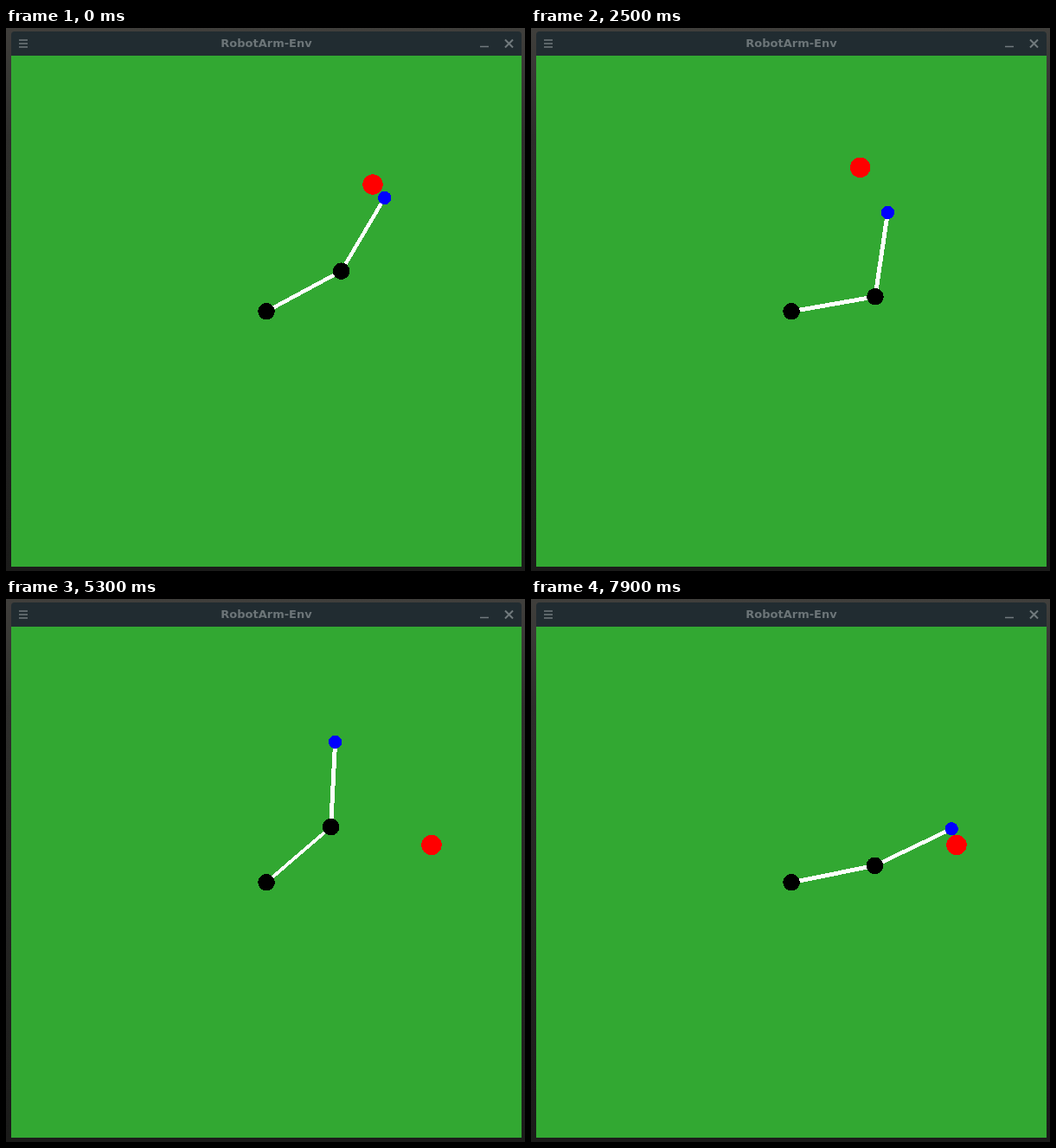
These frames come from a looping animation (600 by 628 pixels, 8000 ms). An HTML page:

```html
<!DOCTYPE html>
<html lang="en">
<head>
<meta charset="utf-8">
<title>RobotArm-Env</title>
<style>
  html, body { margin: 0; width: 100%; height: 100%; overflow: hidden; background: #1f1f1e; }
  svg { display: block; }
</style>
</head>
<body>
<svg width="600" height="628" viewBox="0 0 600 628">
  <defs>
    <linearGradient id="desk" x2="0" y2="1">
      <stop offset="0" stop-color="#403f3c"/>
      <stop offset=".2" stop-color="#2e2e2c"/>
      <stop offset="1" stop-color="#1b1b1a"/>
    </linearGradient>
  </defs>
  <rect width="600" height="628" fill="url(#desk)"/>
  <path d="M6 32V8Q6 4 10 4H592Q596 4 596 8V32Z" fill="#212c31"/>
  <rect x="6" y="32" width="590" height="591" fill="#32a832"/>
  <g stroke="#717a7d" stroke-width="1.6" fill="none">
    <path d="M15 14H25M15 18H25M15 22H25M548 21.5H558"/>
    <path d="M577 13.5L586 22.5M586 13.5L577 22.5" stroke-width="2"/>
  </g>
  <text x="301" y="22" text-anchor="middle" fill="#6c7578"
    font-family="'DejaVu Sans', sans-serif" font-size="13" font-weight="700">RobotArm-Env</text>
  <g shape-rendering="crispEdges">
    <circle id="target" r="11.7" fill="#f00"/>
    <path id="links" fill="#fff"/>
    <circle cx="301" cy="327.8" r="9.8"/>
    <circle id="elbow" r="9.8"/>
    <circle id="tip" r="7.7" fill="#00f"/>
  </g>
</svg>
<script>
const LOOP = 8000, STEP = 100, LINK = 98.4, WIDTH = 5;
const base = { x: 301, y: 327.8 };

// The joints turn at a steady rate between these turning points (degrees).
const turns = [
  { step: 0, shoulder: 28.3, bend: 31.1 },
  { step: 2, shoulder: 33, bend: 29.5 },
  { step: 11, shoulder: 4.5, bend: 31 },
  { step: 16, shoulder: 10, bend: 45.5 },
  { step: 27, shoulder: 10, bend: 77.3 },
  { step: 33, shoulder: 19.9, bend: 73.6 },
  { step: 53, shoulder: 40.7, bend: 46.4 },
  { step: 66, shoulder: 29, bend: 27.8 },
  { step: 79, shoulder: 11.4, bend: 14.2 }
];

// A new target appears once the last one is reached.
const targets = [
  { step: 0, x: 424, y: 181 },
  { step: 2, x: 478, y: 261 },
  { step: 11, x: 380.6, y: 161.3 },
  { step: 53, x: 492, y: 284.5 }
];

const get = id => document.getElementById(id);
const mix = (a, b, k) => a + (b - a) * k;

function poseAt(step) {
  const i = Math.max(1, turns.findIndex(t => t.step >= step));
  const a = turns[i - 1], b = turns[i];
  const k = (step - a.step) / (b.step - a.step);
  return { shoulder: mix(a.shoulder, b.shoulder, k), bend: mix(a.bend, b.bend, k) };
}

function reach(from, degrees) {
  const a = degrees * Math.PI / 180;
  return { x: from.x + LINK * Math.cos(a), y: from.y - LINK * Math.sin(a) };
}

// Thickness runs along one axis only, so diagonal links look thinner.
function link(a, b) {
  const flat = Math.abs(b.x - a.x) > Math.abs(b.y - a.y);
  const w = flat ? 0 : WIDTH / 2, h = flat ? WIDTH / 2 : 0;
  return `M${a.x - w} ${a.y - h}L${b.x - w} ${b.y - h}L${b.x + w} ${b.y + h}L${a.x + w} ${a.y + h}Z`;
}

function place(id, { x, y }) {
  get(id).setAttribute("cx", x);
  get(id).setAttribute("cy", y);
}

function draw() {
  const step = Math.floor((performance.now() % LOOP) / STEP);
  const { shoulder, bend } = poseAt(step);
  const elbow = reach(base, shoulder), tip = reach(elbow, shoulder + bend);
  get("links").setAttribute("d", link(base, elbow) + link(elbow, tip));
  place("target", targets.findLast(t => t.step <= step));
  place("elbow", elbow);
  place("tip", tip);
  requestAnimationFrame(draw);
}
draw();
</script>
</body>
</html>
```
